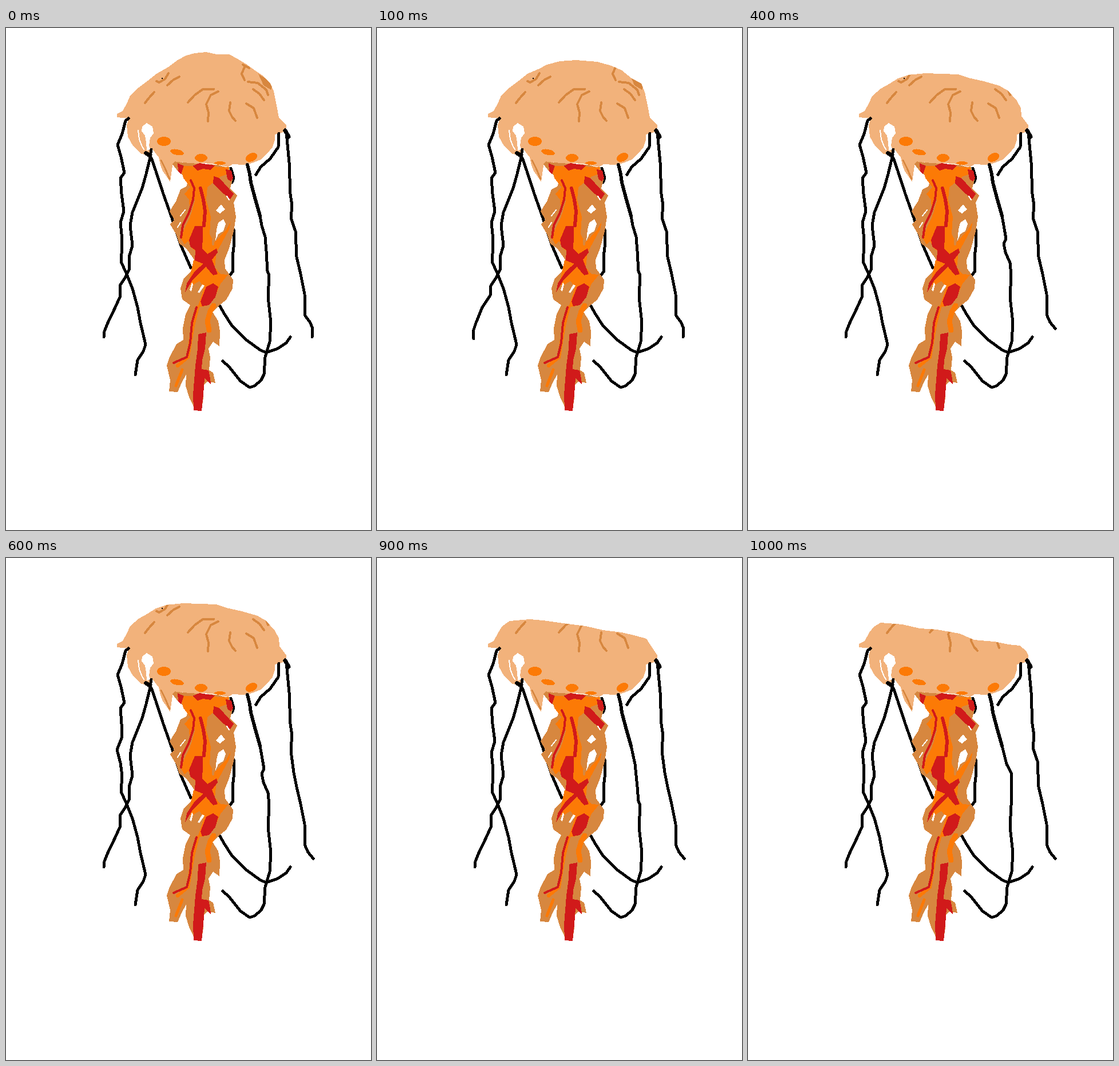
An HTML page that plays this animation: 638 px wide and 877 px high, repeating every 1.1 s.

```html
<!DOCTYPE html>
<html lang="en">
<head>
<meta charset="utf-8">
<title>Jellyfish</title>
<style>
html, body { margin: 0; width: 100%; height: 100%; overflow: hidden; background: #fff; }
svg { display: block; width: 100%; height: 100%; shape-rendering: crispEdges; }
.line { fill: none; stroke-linecap: round; stroke-linejoin: round; }
</style>
</head>
<body>
<svg id="stage" viewBox="0 0 638 877">
  <defs><clipPath id="dome"><path id="domeClip"/></clipPath></defs>
</svg>
<script>
const PEACH = '#f2b27b', BROWN = '#d7873f', ORANGE = '#fc7a06', RED = '#d11a1a', WHITE = '#fff';
const stage = document.getElementById('stage');

function add(tag, attrs, parent = stage) {
  const node = document.createElementNS('http://www.w3.org/2000/svg', tag);
  for (const key in attrs) node.setAttribute(key, attrs[key]);
  return parent.appendChild(node);
}
const fill = (pts, color, parent) => add('path', { d: `M${pts}Z`, fill: color }, parent);
const line = (pts, width, color = '#000', parent) =>
  add('path', { class: 'line', d: `M${pts}`, stroke: color, 'stroke-width': width }, parent);

// Bell: the rim is fixed, the crown is lowered step by step.
const RIM = `490,170 489,181 478,184 470,186 470,196 466,208 456,220 445,230 430,236 415,239 396,238
  388,243 368,238 345,236 325,240 308,234 303,240 295,234 291,240 289,255 287,269 281,260 274,250
  270,240 267,226 256,212 250,222 236,220 222,206 213,190 211,170 215,158 194,156`;
const LEFT = '194,150 204,145 212,130 ';
const CROWNS = [
  `217,118 232,104 248,92 263,80 284,68 300,56 315,48 330,44 350,42 368,46 390,46 405,54 420,63
   435,74 450,84 462,97 468,110 471,125 474,140 477,157`,
  `217,118 232,104 248,92 263,80 284,71 297,64 320,58 348,56 385,59 410,66 428,74 445,88 462,97
   468,112 474,140 477,157`,
  `217,119 232,106 248,97 262,88 280,82 310,79 367,81 385,87 412,93 440,101 455,110 470,127
   477,140 478,154`,
  `217,118 232,107 245,101 289,97 320,103 360,107 395,110 425,116 450,121 467,129 475,142 478,155`,
  `219,119 232,110 267,107 290,109 325,114 365,119 395,126 428,130 453,136 471,141 478,152`,
  `220,120 232,113 270,116 300,123 330,125 370,132 395,143 430,146 455,151 475,153 486,162`
];

const dome = add('path', { fill: PEACH });
const marks = add('g', { 'clip-path': 'url(#dome)' });
[
  '284,79 278,89 268,95 263,93', '303,85 292,91 282,100', '259,112 250,122 243,131',
  '318,130 330,117 344,107 363,107', '371,111 358,117 350,133 354,148 353,163',
  '392,130 390,145 395,155 401,162', '420,132 433,140 439,157', '414,64 425,70',
  '417,68 412,80 417,91', '423,94 440,96 455,108 458,117', '432,107 443,115 451,126'
].forEach(pts => line(pts, 4, BROWN, marks));
fill('441,80 455,89 466,100 463,108 450,100', BROWN, marks);
fill('272,87 274,87 274,89 272,89', '#000', marks);

fill('238,172 246,166 256,172 258,184 252,192 250,205 252,212 246,214 245,200 243,188 237,180', WHITE);
line('231,179 233,195 238,207 241,212', 2, WHITE);
line('271,231 278,245 286,264', 3, BROWN);
fill('291,238 296,232 305,242 310,258 301,251', BROWN);

// Tentacles; the moving ones get their paths from the current pose.
line('244,218 254,227 262,250 275,290 290,332 305,378 323,419', 5);
line('245,219 252,222', 7);
line('477,184 476,208 462,228 445,243 437,256', 5);
line('374,486 382,500 395,520 420,545 445,563 455,567 475,560 490,550 497,540', 5);
line('398,352 399,375 396,400 397,425 392,431', 5);
line('393,245 398,262 395,270', 5);
line('422,239 426,255 428,270 436,300 444,328', 6);
line('488,179 494,190', 7);
const farLeft = line('0,0', 5), nearLeft = line('0,0', 5);
const nearRight = line('0,0', 5), farRight = line('0,0', 5);

const BEND = {
  farLeft: ['206,320 200,340 202,360', '202,315 194,335 200,358'],
  nearLeft: ['200,468 190,490 178,515 172,530 171,540', '198,467 184,488 173,515 168,530 169,543'],
  nearRight: ['447,345 453,365 455,390 457,425', '451,368 447,377 450,392 458,410',
    '451,360 455,400 457,425', '452,360 461,377 460,405'],
  farRight: ['506,355 508,400', '499,345 503,375 508,400'],
  tip: ['532,515 536,525 535,540', '532,515 536,525 535,537', '528,514 537,525']
};

// Oral arms
fill(`298,234 308,255 318,270 315,277 305,282 297,303 286,320 294,335 287,343 297,360 303,377
  315,385 327,402 333,410 323,425 311,437 305,455 308,474 322,484 314,500 309,525 310,545 298,552
  286,575 281,590 287,615 285,635 300,636 307,620 315,605 314,625 320,645 326,657 330,668 342,668
  345,645 344,625 352,618 366,620 362,602 355,598 357,575 354,560 362,548 373,556 374,530 371,512
  361,496 372,485 385,475 396,455 397,440 390,430 383,420 382,405 390,385 398,355 402,330 398,305
  404,293 392,280 396,265 390,245 370,239 335,237`, BROWN);
fill(`305,241 390,243 388,255 376,259 365,268 352,278 350,300 358,330 356,360 364,375 385,352
  393,338 390,352 372,385 365,395 340,395 325,385 318,372 312,378 306,368 312,350 322,330 320,300
  312,290 322,278 310,262`, ORANGE);
fill(`328,405 350,398 362,400 368,392 365,418 375,430 388,431 375,447 365,470 350,485 335,488
  341,470 346,453 338,442 322,452 320,440`, ORANGE);
line('335,488 327,520 322,550 318,575 300,590', 6, ORANGE);
line('363,485 357,495 352,512 355,528', 9, ORANGE);
line('308,597 297,625', 5, ORANGE);
line('329,300 322,325 314,340', 3, BROWN);
line('362,292 358,318 364,345 362,378', 4, BROWN);

[
  '326,241 338,236 365,240 358,248 345,246 335,249',
  '300,236 311,241 306,256 301,250',
  '363,259 373,262 398,290 392,299 375,285 362,272',
  '384,247 394,249 397,262 393,268 387,264',
  `330,346 344,346 344,365 343,385 352,395 368,385 370,392 360,405 370,430 362,432 345,412
   330,406 331,388 322,382 320,370`,
  '350,452 362,446 371,452 366,470 355,484 343,486 340,478',
  '347,410 350,417 326,440 313,462 316,446 330,425',
  `336,535 350,532 348,560 343,580 342,596 354,598 357,612 358,622 347,612 345,640 342,669
   328,668 327,640 329,615 331,590 335,560`
].forEach(pts => fill(pts, RED));
line('323,266 329,280 327,300 320,322 309,345 306,366', 4, RED);
line('340,280 345,300 348,320 346,345', 6, RED);
line('333,488 325,515 322,550 316,575 293,585', 4, RED);

[
  '371,340 380,334 384,342 380,355 371,360 366,372 368,352',
  '367,319 376,308 383,317 374,324',
  '325,444 327,448 324,460 321,458',
  '343,448 347,450 338,463 335,462'
].forEach(pts => fill(pts, WHITE));
line('313,318 305,328', 2, WHITE);
line('305,340 300,348', 2, WHITE);
line('386,294 390,300', 2, WHITE);

[[276, 198, 12, 8, 0], [299, 217, 12, 5, 12], [341, 227, 11, 7, 0], [374, 236, 10, 3, 0], [429, 226, 11, 7, -25]]
  .forEach(([cx, cy, rx, ry, turn]) =>
    add('ellipse', { cx, cy, rx, ry, fill: ORANGE, transform: `rotate(${turn} ${cx} ${cy})` }));

// Each pose: start in ms, crown, then a bend index per moving part.
const LOOP = 1100;
const POSES = [
  { at: 0, crown: 0, fl: 0, nl: 0, nr: 0, fr: 0, tip: 0 },
  { at: 100, crown: 1, fl: 0, nl: 1, nr: 0, fr: 0, tip: 0 },
  { at: 300, crown: 1, fl: 0, nl: 1, nr: 0, fr: 0, tip: 1 },
  { at: 400, crown: 2, fl: 0, nl: 0, nr: 1, fr: 0, tip: 2 },
  { at: 600, crown: 2, fl: 1, nl: 0, nr: 1, fr: 1, tip: 2 },
  { at: 800, crown: 3, fl: 0, nl: 0, nr: 2, fr: 1, tip: 2 },
  { at: 900, crown: 4, fl: 0, nl: 0, nr: 2, fr: 1, tip: 2 },
  { at: 1000, crown: 5, fl: 0, nl: 0, nr: 3, fr: 0, tip: 2 }
];
const domeClip = document.getElementById('domeClip');
const setPath = (node, ...parts) => node.setAttribute('d', 'M' + parts.join(' '));

function show(p) {
  for (const node of [dome, domeClip]) setPath(node, LEFT, CROWNS[p.crown], RIM, 'Z');
  setPath(farLeft, '214,158 209,162 203,185 195,204 201,225 207,253 200,262 202,290',
    BEND.farLeft[p.fl], '203,380 201,408 211,430 221,455 230,488 235,515 244,553 240,565 230,580 226,606');
  setPath(nearLeft, '254,212 251,230 245,255 238,280 228,305 221,322 217,345 221,380 215,400 216,420 209,435 199,450',
    BEND.nearLeft[p.nl]);
  setPath(nearRight, '436,300 444,328', BEND.nearRight[p.nr],
    '460,432 458,470 463,515 461,548 453,575 451,605 446,615 435,625 426,628 410,617 390,592 379,582');
  setPath(farRight, '490,182 495,235 497,290 500,310 498,332', BEND.farRight[p.fr],
    '515,430 522,465 523,503', BEND.tip[p.tip]);
}

let current;
function tick() {
  const t = performance.now() % LOOP;
  const pose = POSES.filter(p => p.at <= t).pop();
  if (pose !== current) show(current = pose);
  requestAnimationFrame(tick);
}
tick();
</script>
</body>
</html>
```
